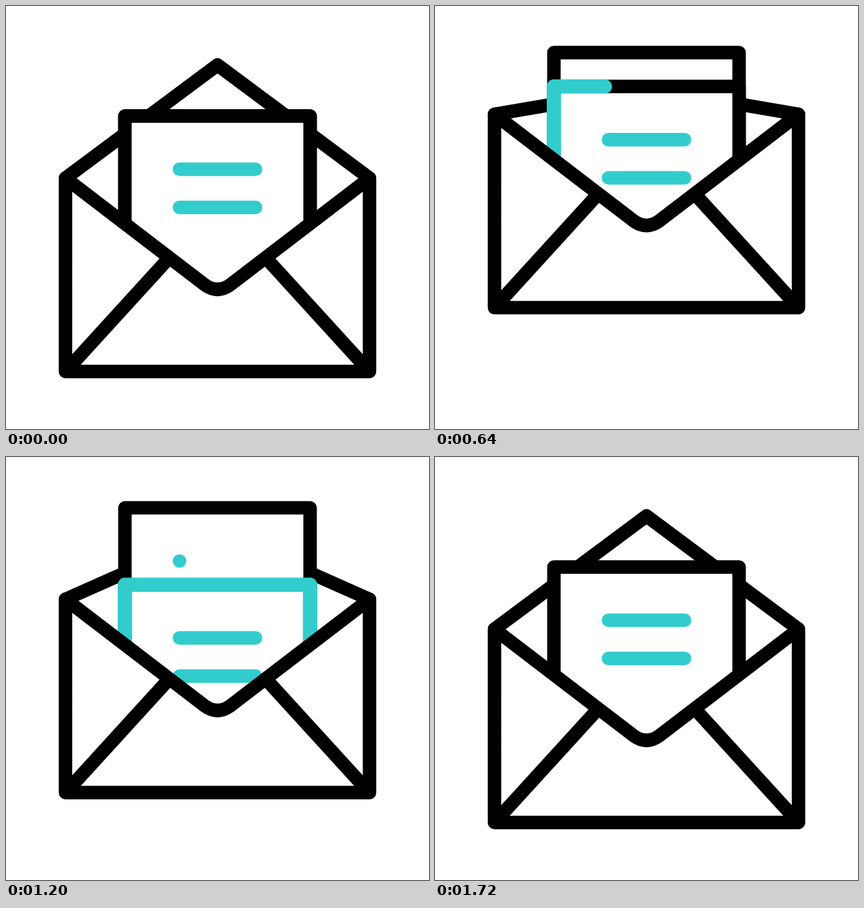
Write an HTML page with a canvas that moves like this. It is 640 px wide and 640 px high and loops after 2 s.

```html
<!DOCTYPE html>
<html lang="en">
<head>
<meta charset="utf-8">
<title>Open envelope</title>
<style>
html, body { margin: 0; width: 100%; height: 100%; overflow: hidden; background: #fff; }
canvas { display: block; width: 100vmin; height: 100vmin; }
</style>
</head>
<body>
<canvas id="stage" width="640" height="640"></canvas>
<script>
const ctx = document.getElementById('stage').getContext('2d');
const LOOP = 2000, STEP = 40;
const INK = '#000', TEAL = '#33cccc', PEN = 20.4;
const RISE = [0.6, 0.25], FALL = [0.5, 0.25], SMOOTH = [1 / 3, 2 / 3];
const SHEET = new Path2D('M179.9 446.5V166.5H460.1V446.5');
const SHEET_LENGTH = 840;
const MOUTH = 'M90 260.5L301 422Q320 435.5 339 422L550 260.5';
const pocket = new Path2D(MOUTH + 'V-600H90Z');
const front = new Path2D(MOUTH + 'V553H90V260.5M90 553L246 382M550 553L394 382');

// Progress 0..1 along a cubic Bezier with handles (x1, 0) and (x2, 1)
function ease(t, start, duration, [x1, x2]) {
  const x = (t - start) / duration;
  if (x <= 0) return 0;
  if (x >= 1) return 1;
  let lo = 0, hi = 1, s;
  for (let i = 0; i < 24; i++) {
    s = (lo + hi) / 2;
    const at = 3 * (1 - s) * s * ((1 - s) * x1 + s * x2) + s ** 3;
    if (at < x) lo = s; else hi = s;
  }
  return s * s * (3 - 2 * s);
}

function stroke(path, color = INK, width = PEN) {
  ctx.strokeStyle = color;
  ctx.lineWidth = width;
  ctx.stroke(path);
}

function textLine(y, amount) {
  if (!amount) return;
  const line = new Path2D();
  line.moveTo(262.4, y);
  line.lineTo(262.4 + 115.2 * amount, y);
  stroke(line, TEAL);
}

function sheet(dy, tint, first, second) {
  ctx.save();
  ctx.translate(0, dy);
  ctx.fillStyle = '#fff';
  ctx.fill(SHEET);
  stroke(SHEET);
  if (tint) {
    ctx.setLineDash([SHEET_LENGTH * tint, 2 * SHEET_LENGTH]);
    stroke(SHEET, TEAL, 21.6);
    ctx.setLineDash([]);
  }
  textLine(247, first);
  textLine(304.7, second);
  ctx.restore();
}

function draw(t) {
  const body = 100 * (ease(t, 910, 683, FALL) - ease(t, 136, 639, RISE));
  const fold = 137 * (ease(t, 240, 452, SMOOTH) - ease(t, 970, 463, SMOOTH));
  const oldSheet = 340 * ease(t, 943, 873, FALL) - 46.4 * ease(t, 184, 584, RISE);
  const newSheet = 105.5 * (ease(t, 1022, 690, FALL) - ease(t, 179, 675, RISE));

  ctx.fillStyle = '#fff';
  ctx.fillRect(0, 0, 640, 640);
  ctx.lineCap = ctx.lineJoin = 'round';

  const flap = new Path2D();
  flap.moveTo(90, 260.5 + body);
  flap.lineTo(320, 89.2 + body + fold);
  flap.lineTo(550, 260.5 + body);
  stroke(flap);

  ctx.save();
  ctx.translate(0, body);
  ctx.clip(pocket);
  ctx.translate(0, -body);
  sheet(newSheet, 0, ease(t, 1180, 465, FALL), ease(t, 1255, 465, FALL));
  sheet(oldSheet, ease(t, 405, 560, RISE), 1, 1);
  ctx.restore();

  ctx.save();
  ctx.translate(0, body);
  stroke(front);
  ctx.restore();
}

function tick() {
  draw(Math.floor(performance.now() % LOOP / STEP) * STEP);
  requestAnimationFrame(tick);
}
tick();
</script>
</body>
</html>
```
